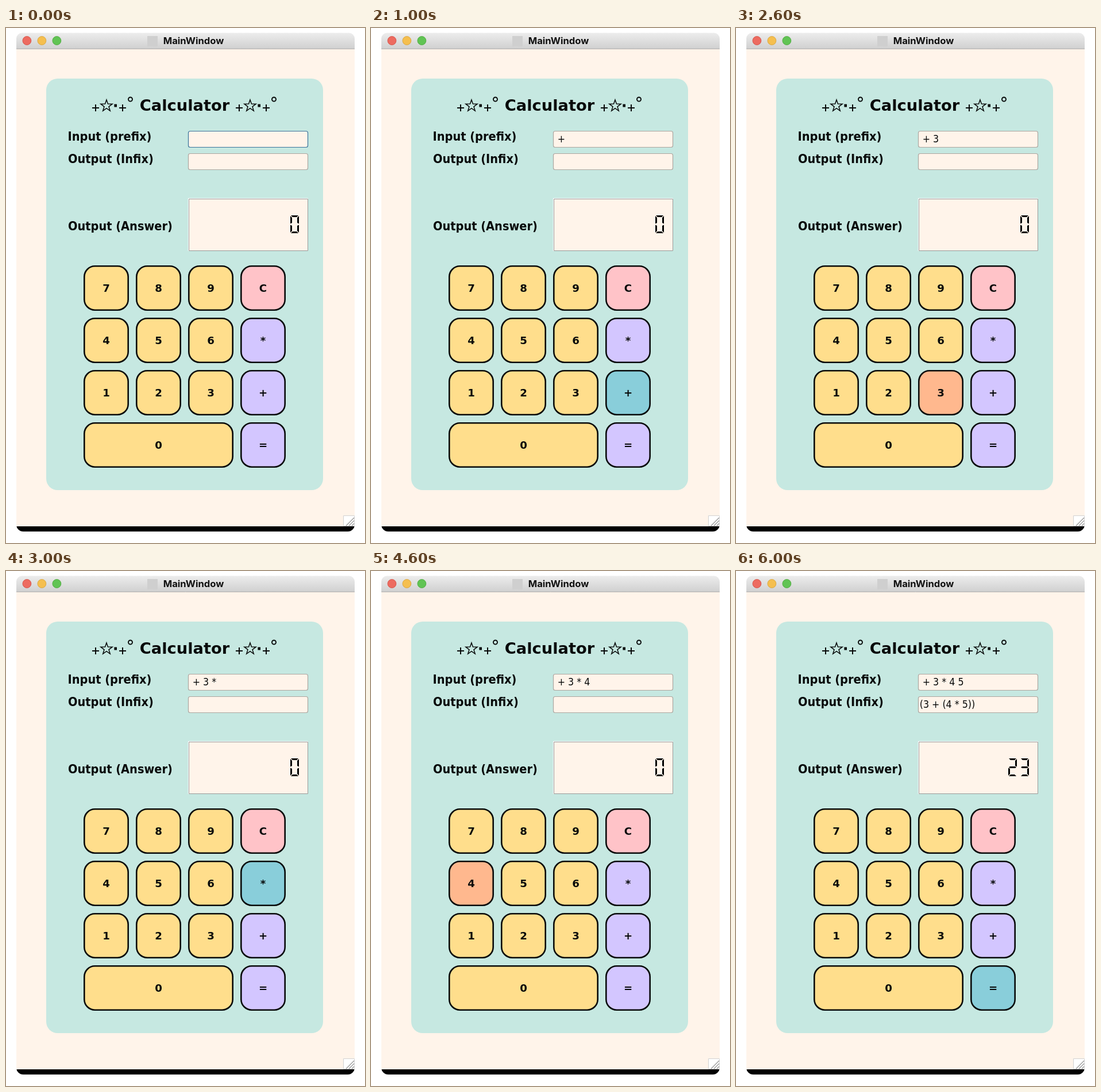
An HTML page with a canvas for the animation above (7 s loop, 625 px wide and 896 px high).

```html
<!DOCTYPE html>
<html lang="en">
<head>
<meta charset="utf-8">
<title>Calculator</title>
<style>
html, body { margin: 0; width: 100%; height: 100%; overflow: hidden; background: #fff; }
canvas { display: block; }
</style>
</head>
<body>
<canvas id="stage" width="625" height="896"></canvas>
<script>
const ctx = document.getElementById('stage').getContext('2d');
const SANS = '"DejaVu Sans", sans-serif';
const CREAM = '#fff4ea', INK = '#080a0a';
const YELLOW = '#ffde8c', ORANGE = '#ffb88e', PINK = '#ffc3c8';
const PURPLE = '#d3c6ff', TEAL = '#89ceda';

const STEP = 1000;
const presses = ['', '+', '3', '*', '4', '5', '='];

// Each key: label, column, row, column span
const keys = [
  ...['789C', '456*', '123+'].flatMap((line, row) =>
    [...line].map((label, col) => [label, col, row, 1])),
  ['0', 0, 3, 3], ['=', 3, 3, 1]
];

// Lit segments: top, upper left, upper right, middle, lower left, lower right, bottom
const segments = { 0: '1110111', 2: '1011101', 3: '1011011' };

function box(x, y, w, h, r, fill, stroke, line = 1) {
  ctx.beginPath();
  ctx.roundRect(x, y, w, h, r);
  if (fill) { ctx.fillStyle = fill; ctx.fill(); }
  if (stroke) { ctx.strokeStyle = stroke; ctx.lineWidth = line; ctx.stroke(); }
}

function disc(x, y, r, fill, stroke, line = 1) {
  box(x - r, y - r, 2 * r, 2 * r, r, fill, stroke, line);
}

function poly(points, fill, stroke, line = 1) {
  ctx.beginPath();
  points.forEach(([x, y]) => ctx.lineTo(x, y));
  ctx.closePath();
  if (fill) { ctx.fillStyle = fill; ctx.fill(); }
  if (stroke) { ctx.strokeStyle = stroke; ctx.lineWidth = line; ctx.stroke(); }
}

function line(x1, y1, x2, y2, color, width = 1) {
  ctx.beginPath();
  ctx.moveTo(x1, y1);
  ctx.lineTo(x2, y2);
  ctx.strokeStyle = color;
  ctx.lineWidth = width;
  ctx.stroke();
}

function text(str, x, y, font, align = 'left', color = INK) {
  ctx.font = font;
  ctx.textAlign = align;
  ctx.fillStyle = color;
  ctx.fillText(str, x, y);
}

// Condensed face at the size that keeps the line length when it is missing
function condensed(weight, size) {
  const width = stretch => {
    ctx.font = `${weight} ${stretch} 100px ${SANS}`;
    return ctx.measureText('Output 345').width;
  };
  const ratio = width('condensed') / width('normal');
  return `${weight} condensed ${size / ratio}px ${SANS}`;
}

function drawWindow() {
  ctx.fillStyle = '#fff';
  ctx.fillRect(0, 0, 625, 896);
  box(18, 850, 589, 26, [0, 0, 12, 12], '#000');
  const bar = ctx.createLinearGradient(0, 9, 0, 36);
  bar.addColorStop(0, '#ececec');
  bar.addColorStop(1, '#d0d0d0');
  box(18, 8.5, 589, 28, [10, 10, 0, 0], bar);
  ctx.fillStyle = CREAM;
  ctx.fillRect(18, 36, 589, 831);
  line(18, 36.3, 607, 36.3, '#aaa');
  disc(36.4, 22, 7.4, '#ed6b60', '#d8564c');
  disc(62.4, 22, 7.4, '#f5bf4f', '#dba842');
  disc(88.4, 22, 7.4, '#61c454', '#52ad44');
  box(246, 14, 18, 18, 0, '#cfcfcf');
  text('MainWindow', 326.5, 28.3, 'bold 16.6px Inter, sans-serif', 'center', '#111');
  box(587.5, 848.5, 19, 18, 0, '#fff', '#d2d2d2');
  [14, 9, 4].forEach(d => line(606 - d, 866, 606, 866 - d, '#999', 1.2));
}

function drawSparkle(x) {
  [x, x + 47].forEach(cx => {
    line(cx - 6, 139, cx + 6, 139, INK, 2);
    line(cx, 133, cx, 145, INK, 2);
  });
  const star = Array.from({ length: 10 }, (_, i) => {
    const a = -Math.PI / 2 + i * Math.PI / 5, r = i % 2 ? 4.2 : 10.6;
    return [x + 19 + r * Math.cos(a), 135.5 + r * Math.sin(a)];
  });
  poly(star, null, INK, 1.5);
  ctx.fillStyle = INK;
  ctx.fillRect(x + 32.4, 132.5, 4.6, 5);
  disc(x + 60.5, 124, 3.5, null, INK, 1.9);
}

function drawField(y, border) {
  box(317.5, y + 0.5, 208, 28, 3, CREAM, border, 1.2);
}

function drawDigit(char, l) {
  const r = l + 15, t = 326, m = 341.5, b = 357, w = 3;
  const shapes = [
    [[l + 1, t], [r - 1, t], [r - w - 1, t + w], [l + w + 1, t + w]],
    [[l, t + 1], [l + w, t + w + 1], [l + w, m - 2.5], [l, m - 1]],
    [[r, t + 1], [r - w, t + w + 1], [r - w, m - 2.5], [r, m - 1]],
    [[l + 1, m], [l + w, m - 1.5], [r - w, m - 1.5], [r - 1, m], [r - w, m + 1.5], [l + w, m + 1.5]],
    [[l, b - 1], [l + w, b - w - 1], [l + w, m + 2.5], [l, m + 1]],
    [[r, b - 1], [r - w, b - w - 1], [r - w, m + 2.5], [r, m + 1]],
    [[l + 1, b], [r - 1, b], [r - w - 1, b - w], [l + w + 1, b - w]]
  ];
  shapes.forEach((shape, i) => { if (segments[char][i] === '1') poly(shape, '#000'); });
}

function drawDisplay(value) {
  ctx.fillStyle = CREAM;
  ctx.fillRect(317, 296, 209, 92);
  line(317.5, 296, 317.5, 388, '#fff');
  line(317, 296.5, 526, 296.5, '#fff');
  box(318.5, 297.5, 207, 90, 0, null, '#999');
  [...value].reverse().forEach((char, i) => drawDigit(char, 495 - 21 * i));
}

function drawKey([label, col, row, span], pressed) {
  const x = 135 + 91 * col, y = 413 + 91 * row, w = 79 + 91 * (span - 1);
  const digit = /\d/.test(label);
  const rest = digit ? YELLOW : label === 'C' ? PINK : PURPLE;
  const fill = label === pressed ? (digit ? ORANGE : TEAL) : rest;
  box(x + 1.3, y + 1.3, w - 2.6, 76.4, 18.5, fill, INK, 2.6);
  text(label, x + w / 2, y + 45.6, `bold 18.2px ${SANS}`, 'center');
}

function draw(now) {
  const step = Math.floor(now / STEP) % presses.length;
  const pressed = presses[step];
  const solved = pressed === '=';
  const typed = presses.slice(1, step + 1).filter(key => key !== '=');

  drawWindow();
  box(70, 88, 482, 716, 20, '#c6e8e1');
  drawSparkle(156);
  text('Calculator', 311, 144, `bold 27.3px ${SANS}`, 'center');
  drawSparkle(406);

  const labelFont = condensed('bold', 19.4);
  text('Input (prefix)', 107.5, 196, labelFont);
  text('Output (Infix)', 108, 235, labelFont);
  text('Output (Answer)', 108, 352, labelFont);

  const fieldFont = condensed('normal', 15.9);
  drawField(179, step ? '#aca6a0' : '#38739b');
  drawField(218, '#aca6a0');
  text(typed.map(key => ' ' + key).join(''), 319.7, 199, fieldFont);
  if (solved) text('(3 + (4 * 5))', 319.7, 238, fieldFont);
  drawDisplay(solved ? '23' : '0');

  keys.forEach(key => drawKey(key, pressed));
}

const start = performance.now();
function tick() {
  draw(performance.now() - start);
  requestAnimationFrame(tick);
}
tick();
</script>
</body>
</html>
```
